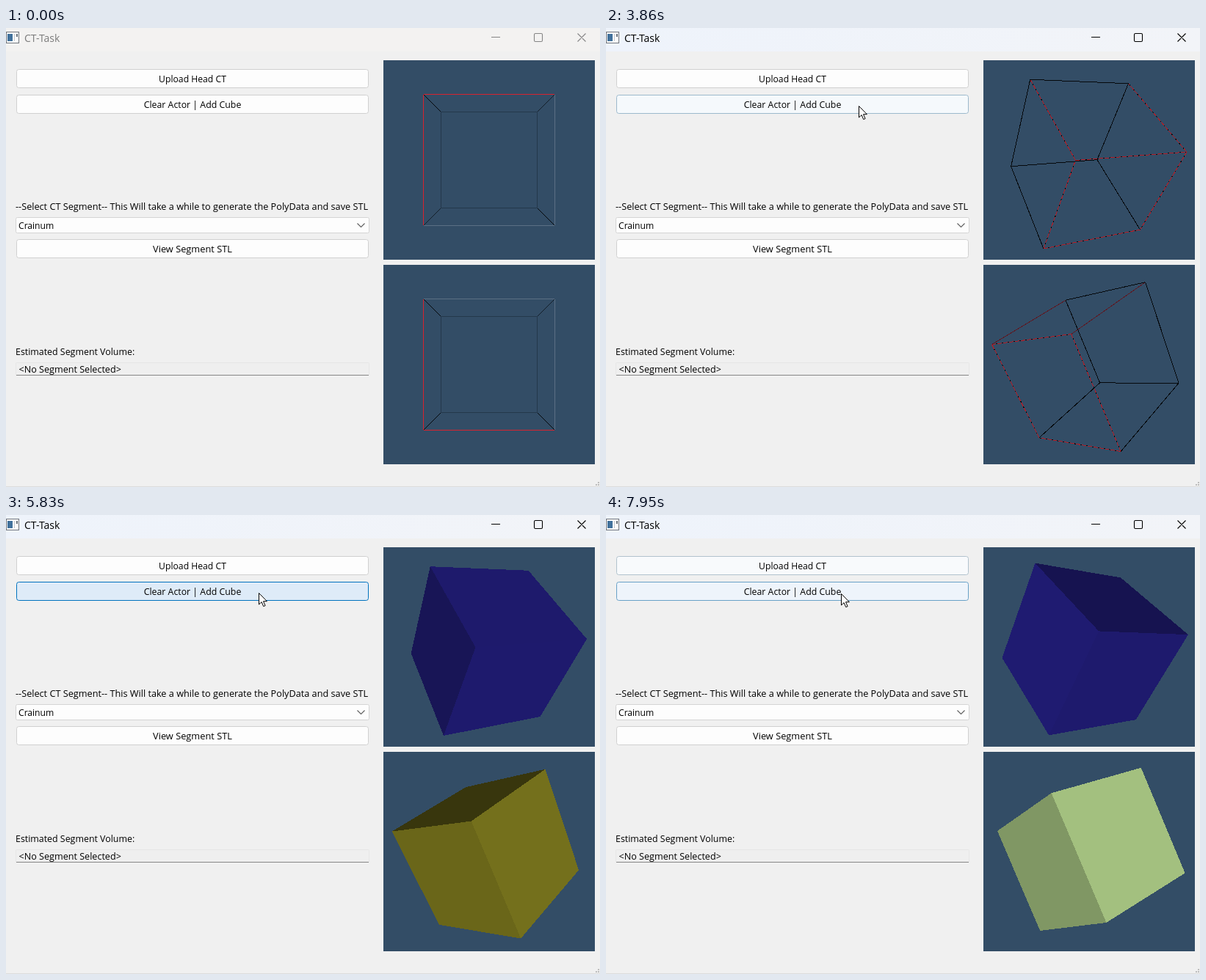
Animation, 809 px wide and 626 px high, one loop 8 s. Source, as an HTML page:

```html
<!DOCTYPE html>
<html lang="en">
<head>
<meta charset="utf-8">
<title>CT-Task</title>
<style>
  html, body { margin: 0; width: 100%; height: 100%; overflow: hidden; background: #f0f0f0; }
  svg { display: block; }
  text { font-family: "Open Sans", "Noto Sans", sans-serif; fill: #000; white-space: pre; }
</style>
</head>
<body>
<svg id="stage" width="809" height="626" viewBox="0 0 809 626">
  <defs>
    <linearGradient id="mica">
      <stop offset="0" stop-color="#eef3fb"/>
      <stop offset="1" stop-color="#f2f4f8"/>
    </linearGradient>
  </defs>
</svg>
<script>
const stage = document.getElementById('stage');

function set(el, attrs) {
  for (const key in attrs) el.setAttribute(key, attrs[key]);
  return el;
}
function add(tag, attrs, parent = stage) {
  return parent.appendChild(set(document.createElementNS('http://www.w3.org/2000/svg', tag), attrs));
}
function label(str, x, y, size, anchor = 'start') {
  const el = add('text', { x, y, 'font-size': size, 'text-anchor': anchor });
  el.textContent = str;
  return el;
}
function box(x, y, width, height, fill, more = {}) {
  return add('rect', { x, y, width, height, fill, ...more });
}
const mix = (a, b, p) => a.map((v, i) => v + (b[i] - v) * p);
const rgb = c => `rgb(${c.map(Math.round)})`;

// Piecewise linear track: keys are [tick, ...values]
function track(keys, n) {
  let i = 0;
  while (i < keys.length - 2 && n > keys[i + 1][0]) i++;
  const [a, b] = [keys[i], keys[i + 1]];
  const p = Math.min(1, Math.max(0, (n - a[0]) / (b[0] - a[0])));
  return mix(a.slice(1), b.slice(1), p);
}

// ---- Window frame ----
box(0, 0, 809, 626, '#f0f0f0');
const bar = box(0, 0, 809, 32, '#f3f2f1');
box(0.5, 5.5, 17, 15, '#fcfcfc', { stroke: '#70757c' });
box(2, 8, 7, 10, '#41719c');
box(11, 8, 1, 10, '#c4c8cc');
box(14, 8, 2, 4, '#6c7680');
const title = label('CT-Task', 25, 19, 14);
const caption = add('path', {
  d: 'M661 12.5h12M721 7.5h8q1.500 0 1.500 1.500v8q0 1.500-1.500 1.500h-8q-1.500 0-1.500-1.500v-8q0-1.500 1.500-1.500zM778.500 7.500l11 11M789.500 7.500l-11 11',
  fill: 'none', 'stroke-width': 1.1
});
box(0, 625, 809, 1, '#dcdcdc');
for (const [x, y] of [[806, 619], [803, 622], [806, 622]]) box(x, y, 2, 2, '#bcbcbc');

// ---- Controls ----
function button(y, str, size) {
  const rect = box(14.5, y + 0.5, 479, 25, '#fdfdfd', { rx: 3, stroke: '#d0d0d0' });
  label(str, 254, y + 18, size, 'middle');
  return rect;
}
function hover(rect, p) {
  set(rect, {
    fill: rgb(mix([253, 253, 253], [222, 235, 248], p)),
    stroke: rgb(mix([208, 208, 208], [0, 114, 190], p))
  });
}
const upload = button(56, 'Upload Head CT', 12.2);
const clear = button(91, 'Clear Actor | Add Cube', 12.35);
button(288, 'View Segment STL', 12.8);

label('--Select CT Segment-- This Will take a while to generate the PolyData and save STL', 13, 248, 12.7);
box(13.5, 258.5, 481, 21, '#fdfdfd', { rx: 2, stroke: '#d4d4d4' });
label('Crainum', 17, 274, 12.1);
add('path', { d: 'M478.500 266.500l5 5l5-5', fill: 'none', stroke: '#5c5c5c', 'stroke-width': 1.1 });

label('Estimated Segment Volume:', 13, 446, 12.4);
box(13.5, 456.5, 481, 17, '#efefef', { rx: 1, stroke: '#e6e6e6' });
box(14, 473, 480, 1, '#868686');
label('<No Segment Selected>', 17.5, 470, 12.6);

// ---- Cube views ----
const DIST = Math.sqrt(0.75) / Math.sin(Math.PI / 12);
const FOCAL = 136 / Math.tan(Math.PI / 12);
const INK = {
  r: '#d8232f', d: '#b41c26', m: '#5c1a24', g: '#5b6f84',
  k: '#05080b', s: '#141f2a', n: '#24384b'
};
const CORNERS = [1, -1].flatMap(z => [[-1, -1, z], [1, -1, z], [1, 1, z], [-1, 1, z]]);
const EDGES = [0, 4, 8].flatMap(kind => [0, 1, 2, 3].map(i => {
  const next = (i + 1) % 4;
  return kind === 0 ? [i, next] : kind === 4 ? [i, i + 4] : [i + 4, next + 4];
}));
// Corner loop, then axis and sign of the outward normal
const FACES = [
  [[0, 1, 2, 3], 2, 1], [[4, 5, 6, 7], 2, -1],
  [[0, 1, 5, 4], 1, -1], [[2, 3, 7, 6], 1, 1],
  [[1, 2, 6, 5], 0, 1], [[3, 0, 4, 7], 0, -1]
];

const unit = v => { const l = Math.hypot(...v); return v.map(c => c / l); };
// A pose is the cube's x and y axis in view space; the rest follows
function axes(pose) {
  const x = unit(pose.slice(0, 3)), raw = pose.slice(3);
  const dot = x.reduce((s, c, i) => s + c * raw[i], 0);
  const y = unit(raw.map((c, i) => c - dot * x[i]));
  const z = [0, 1, 2].map(i => {
    const j = (i + 1) % 3, k = (i + 2) % 3;
    return x[j] * y[k] - x[k] * y[j];
  });
  return [x, y, z];
}

function makeView(top) {
  box(514, top, 288, 272, '#334d66');
  const group = add('g', {
    transform: `translate(658 ${top + 136})`, 'shape-rendering': 'crispEdges'
  });
  return {
    faces: FACES.map(() => add('path', {}, group)),
    under: add('path', { stroke: INK.k, fill: 'none' }, group),
    edges: EDGES.map(() => add('path', { fill: 'none' }, group))
  };
}

function drawCube(view, pose, inks, color) {
  const m = axes(pose);
  const pts = CORNERS.map(c => {
    const [x, y, z] = [0, 1, 2].map(i => (c[0] * m[0][i] + c[1] * m[1][i] + c[2] * m[2][i]) / 2);
    const s = FOCAL / (DIST - z);
    return `${(x * s).toFixed(2)} ${(y * s).toFixed(2)}`;
  });
  FACES.forEach(([loop, axis, sign], i) => {
    const nz = m[axis][2] * sign;
    const shown = color && nz * DIST > 0.5;
    set(view.faces[i], {
      d: shown ? 'M' + loop.map(j => pts[j]).join('L') + 'z' : '',
      fill: shown ? rgb(color.map(c => c * nz)) : 'none'
    });
  });
  const lines = EDGES.map(([a, b]) => color ? '' : `M${pts[a]}L${pts[b]}`);
  set(view.under, { d: inks.includes('d') ? lines.join('') : '' });
  view.edges.forEach((el, i) => set(el, {
    d: lines[i], stroke: INK[inks[i]], 'stroke-dasharray': inks[i] === 'd' ? '6 2' : 'none'
  }));
}

const upper = makeView(44), lower = makeView(323);

const FRONT = [1, 0, 0, 0, 1, 0];
const UP1 = [0.863, -0.066, -0.485, -0.289, 0.737, -0.614];
const UP2 = [0.7715, 0.002, -0.644, -0.377, 0.808, -0.4635];
const LOW1 = [0.717, -0.032, 0.696, 0.3655, 0.864, -0.326];
const LOW2 = [0.5785, -0.226, 0.79, 0.39, 0.916, -0.0175];
const UP_TURN = [[-0.5, ...FRONT], [2, ...UP1], [29.5, ...UP1], [31, ...UP2]];
const LOW_TURN = [[4, ...FRONT], [6, ...LOW1], [33, ...LOW1], [35, ...LOW2]];

const PURPLE = [135, 39, 148], BLUE = [49, 42, 176];
const YELLOW = [167, 161, 40], GREEN = [207, 244, 162];

// ---- Pointer ----
const PATH = [
  [-12.6, 731, 505], [-10.7, 595, 133], [-8.8, 595, 133], [-5.1, 652, 196], [-1, 652, 196],
  [0, 650, 165], [2, 692, 216], [4, 710, 395], [6, 650, 445], [11, 344, 106], [28, 344, 106],
  [30, 705, 190], [31, 718, 180], [33, 700, 450], [35, 686, 434], [37, 380, 72], [38, 320, 107]
];
const PRESSED = [[0, 1], [4, 5], [17, 20], [22, 23], [30, 30], [33, 34]];
const CLEAR_HOVER = [[10, 0], [11, 0.25], [12, 1], [28, 1], [30, 0], [37, 0], [38, 0.5]];
const UPLOAD_HOVER = [[36, 0], [37, 0.6], [38, 0.15]];

const glow = add('circle', { r: 15, fill: '#f0f03c', 'fill-opacity': 0.66 });
const pointer = add('path', {
  d: 'M0.500 0.500v15.500l3.600-3.400l2.600 6l2.400-1l-2.600-5.900h4.900z',
  fill: '#fff', stroke: '#000', 'stroke-linejoin': 'round'
});

function ticks(t) {
  if (t < 2163) return (260 + Math.floor((t - 260) / 142) * 142 - 2170) / 152.1;
  return Math.floor((t - 2163) / 152.1);
}

function draw(t) {
  const n = ticks(t), active = n >= 0;
  set(bar, { fill: active ? 'url(#mica)' : '#f3f2f1' });
  title.style.fill = active ? '#000' : '#7c7c7c';
  set(caption, { stroke: active ? '#000' : '#858585' });
  hover(clear, track(CLEAR_HOVER, n)[0]);
  hover(upload, track(UPLOAD_HOVER, n)[0]);

  drawCube(upper, track(UP_TURN, n), active ? 'ddddddkkkkkk' : 'rggrksksnnnn',
    n < 18 ? null : n < 23 ? PURPLE : BLUE);
  drawCube(lower, track(LOW_TURN, n), n > 4 ? 'ddddmmkkkkkk' : 'ggrrkskknnnn',
    n < 21 ? null : n < 25 ? YELLOW : GREEN);

  const [x, y] = track(PATH, n);
  const down = PRESSED.some(([a, b]) => n >= a && n <= b);
  set(pointer, { transform: `translate(${x} ${y})`, visibility: t >= 260 ? 'visible' : 'hidden' });
  set(glow, { cx: x, cy: y, visibility: down ? 'visible' : 'hidden' });
}

function loop() {
  draw(performance.now() % 8000);
  requestAnimationFrame(loop);
}
loop();
</script>
</body>
</html>
```
